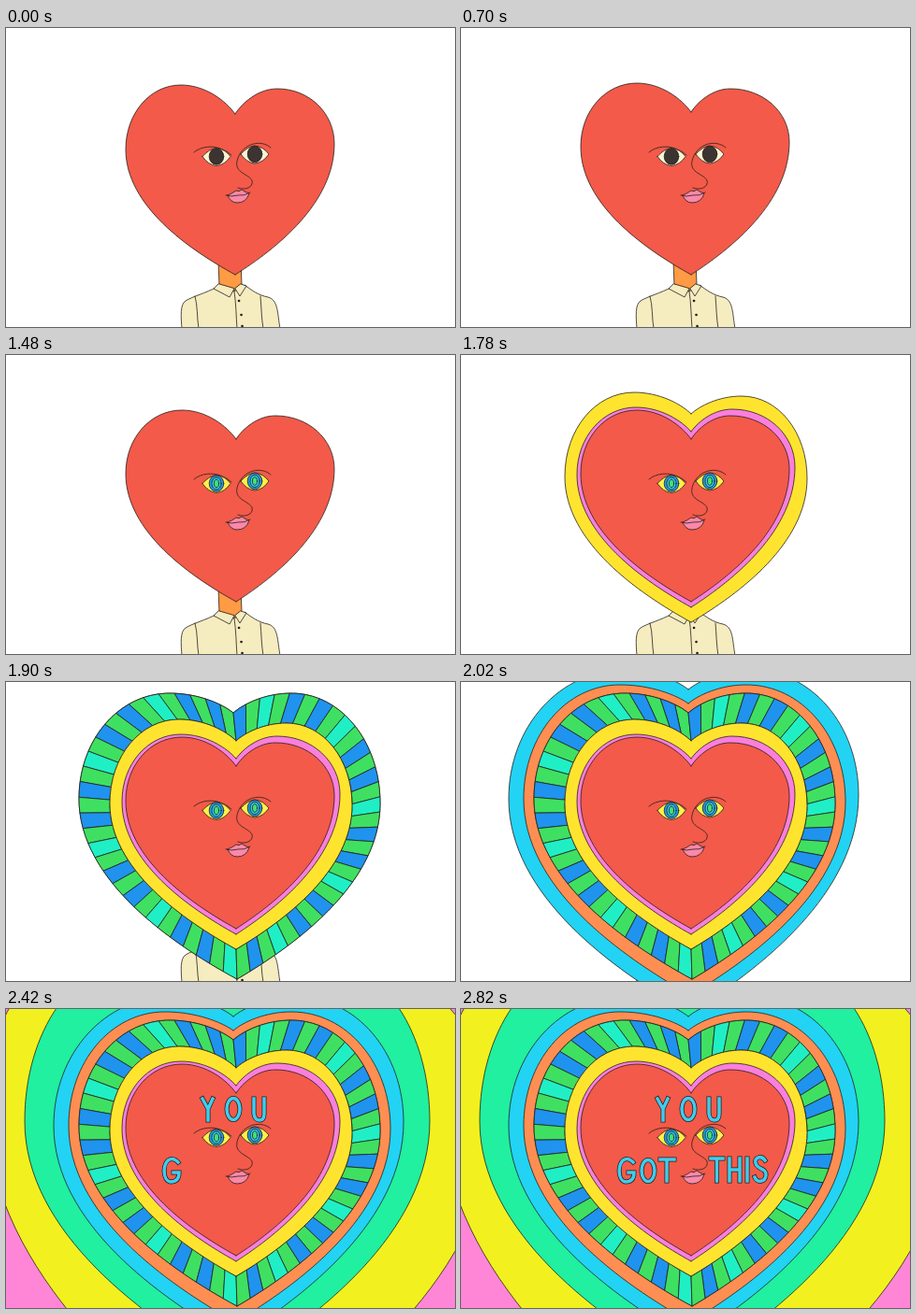
An HTML page for the animation above (2920 ms loop, 480 by 320 pixels).

```html
<!DOCTYPE html>
<html lang="en">
<head>
<meta charset="utf-8">
<title>You got this</title>
<style>
  html, body { margin: 0; width: 100%; height: 100%; overflow: hidden; background: #fff; }
  svg { display: block; width: 100%; height: 100%; }
  .ink { stroke: #26201c; stroke-width: .8; stroke-linejoin: round; stroke-linecap: round; }
  .line { fill: none; }
  .letter path { fill: none; stroke-linecap: square; }
  .letter path:first-child { stroke: #26201c; stroke-width: 5; }
  .letter path:last-child { stroke: #3fcdf0; stroke-width: 3.5; }
</style>
</head>
<body>
<svg viewBox="0 0 480 320" role="img" aria-label="You got this">
  <g class="ink">
    <path fill="#ff9a45" d="M227 250L228 276L244 281L252 274L251 250Z"/>
    <path fill="#f5ecc0" d="M188 322C187 308 186 296 192 292C200 287 213 284 226 277L244 282L255 275C263 281 270 286 280 288C291 291 290 304 293 322Z"/>
    <path class="line" d="M202 287C205 297 204 310 206 322M272 287C273 298 273 310 275 322M244 282C246 295 246 308 247 322"/>
    <path fill="#f5ecc0" d="M227 274L222 279L239 288L244 279ZM245 279L250 287L257 276L251 274Z"/>
    <path class="line" stroke-width="2.6" d="M249 292h.1M251.5 307h.1M252.5 319h.1"/>
  </g>
  <rect data-from="2220" width="480" height="320" fill="#ff86d6"/>
  <g id="hearts" class="ink"></g>
  <g class="ink">
    <path class="line" d="M201 133C209 126 222 126 229 129Q236 131 241 136M283 128C273 119 254 123 248 139C242 155 258 155 263 163C265 171 255 174 248 171"/>
    <g id="eyes"></g>
    <path fill="#fb88a8" d="M237 179Q242 177 246 174Q249 176 252 173Q256 176 260 177Q257 187 247 187Q240 187 237 179Z"/>
    <path class="line" d="M235 179Q241 181 248 179Q255 180 261 176"/>
  </g>
  <g id="letters"></g>
</svg>
<script>
const LOOP = 2920;
const CELLS = 30;
const NS = 'http://www.w3.org/2000/svg';
const $ = id => document.getElementById(id);
const from = t => ({ 'data-from': t });
const until = t => ({ 'data-to': t });

function add(parent, tag, attrs) {
  const el = document.createElementNS(NS, tag);
  for (const key in attrs) el.setAttribute(key, attrs[key]);
  parent.append(el);
  return el;
}

// One side of a heart: notch, top of the lobe, widest point, tip.
function half([nx, ny], [tx, ty], [sx, sy], [px, py]) {
  const mix = (a, b, f) => a + (b - a) * f;
  return `M${nx} ${ny}`
    + `C${mix(nx, tx, .17)} ${mix(ny, ty, .45)} ${mix(tx, nx, .45)} ${ty} ${tx} ${ty}`
    + `C${mix(tx, sx, .56)} ${ty} ${sx} ${mix(sy, ty, .56)} ${sx} ${sy}`
    + `C${sx} ${mix(sy, py, .45)} ${mix(px, sx, .42)} ${mix(py, sy, .2)} ${px} ${py}`;
}

// Left and right are [top, widest point].
function heart(fill, times, notch, left, right, tip) {
  const sides = [left, right].map(side => half(notch, ...side, tip));
  add($('hearts'), 'path', { d: sides.join(''), fill, ...times });
  return sides;
}

heart('#f2f11f', from(2120), [243, -50], [[140, -85], [-22, 100]], [[340, -60], [520, 120]], [243, 480]);
heart('#20f0a0', from(2120), [243, -12], [[140, -52], [20, 120]], [[340, -50], [453, 120]], [243, 385]);
heart('#22d3f4', from(2020), [243, 8], [[175, -13], [51, 125]], [[310, -13], [425, 121]], [244, 354]);
heart('#ff8e52', from(2020), [243, 23], [[170, 3], [67, 125]], [[305, 3], [411, 128]], [245, 335]);
const outer = heart('#3fe062', from(1900), [243, 33], [[175, 12], [78, 125]], [[305, 12], [400, 130]], [247, 318]);
const cells = add($('hearts'), 'g', from(1900));
const inner = heart('#ffe42f', from(1780), [246, 63], [[185, 40], [111, 130]], [[300, 44], [370, 132]], [246, 286]);
heart('#fa7fdd', from(1640), [246, 82], [[187, 56], [124, 128]], [[290, 58], [357, 120]], [246, 270]);
heart('#f35a49', until(700), [245, 92], [[187, 61], [128, 130]], [[290, 65], [351, 124]], [245, 264]);
heart('#f35a49', from(700), [246, 90], [[188, 59], [128, 127]], [[288, 65], [351, 122]], [246, 264]);

function sampler(d) {
  const path = document.createElementNS(NS, 'path');
  path.setAttribute('d', d);
  const length = path.getTotalLength();
  return f => {
    const { x, y } = path.getPointAtLength(f * length);
    return `${x},${y}`;
  };
}

const [green, blue, teal] = ['#3fe062', '#1f93ee', '#20efc6'];
[[green, blue, green, blue, green, teal], [blue, green, teal, green, blue, green]].forEach((cycle, side) => {
  const near = sampler(inner[side]), far = sampler(outer[side]);
  for (let i = 0; i < CELLS; i++) {
    const [a, m, b] = [i, i + .5, i + 1].map(n => n / CELLS);
    const points = [near(a), far(a), far(m), far(b), near(b), near(m)].join(' ');
    add(cells, 'polygon', { points, fill: cycle[i % cycle.length] });
  }
});

function eye(x, y) {
  const g = add($('eyes'), 'g', { transform: `translate(${x} ${y})` });
  const lid = 'M-15 0Q-8 -8 0 -9Q9 -8 15 0Q9 9 0 10Q-9 9 -15 0Z';
  const ring = (rx, ry, fill, times) => add(g, 'ellipse', { rx, ry, fill, ...times });
  add(g, 'path', { d: lid, fill: '#fbf3d3', ...until(1480) });
  add(g, 'path', { d: lid, fill: '#fff04a', ...from(1480) });
  ring(7.8, 8.7, '#3b3431', until(1100));
  ring(7.8, 8.7, '#1f9bea', from(1100));
  ring(5, 6.6, '#3b3431', { ...from(1100), ...until(1300) });
  ring(5, 6.6, '#2fd0ea', from(1300));
  ring(2.5, 4.3, '#45e07a', from(1300));
}
eye(225, 137.5);
eye(266, 135);

const oval = (x, y) => `M${x - 7} ${y}a7 11.5 0 1 1 14 0a7 11.5 0 1 1 -14 0Z`;
const letters = [
  'M210 96L216 107L221 96M216 107V119',
  oval(243, 107),
  'M265 96V112Q266 119 271 119Q276 119 276 112V96',
  'M184 164Q180 159 175 161C167 164 167 184 176 185Q185 185 185 175H179',
  oval(200, 173),
  'M213 161H228M220 161V184',
  'M267 160H280M273.5 160V184',
  'M287 160V184M298 160V184M287 172H298',
  'M306 160V184',
  'M325 162C321 156 313 159 315 165C316 172 327 170 326 178C325 186 316 186 314 180'
];
letters.forEach((d, i) => {
  const step = Math.floor(i * 6 / letters.length);
  const g = add($('letters'), 'g', { class: 'letter', ...from(2320 + step * 100) });
  add(g, 'path', { d });
  add(g, 'path', { d });
});

const timed = [...document.querySelectorAll('[data-from], [data-to]')].map(el => ({
  el, start: +(el.dataset.from || 0), end: +(el.dataset.to || LOOP)
}));
const origin = performance.now();

function draw(now) {
  const t = Math.max(0, now - origin) % LOOP;
  for (const { el, start, end } of timed) {
    el.style.display = t >= start && t < end ? '' : 'none';
  }
  requestAnimationFrame(draw);
}
draw(origin);
</script>
</body>
</html>
```
